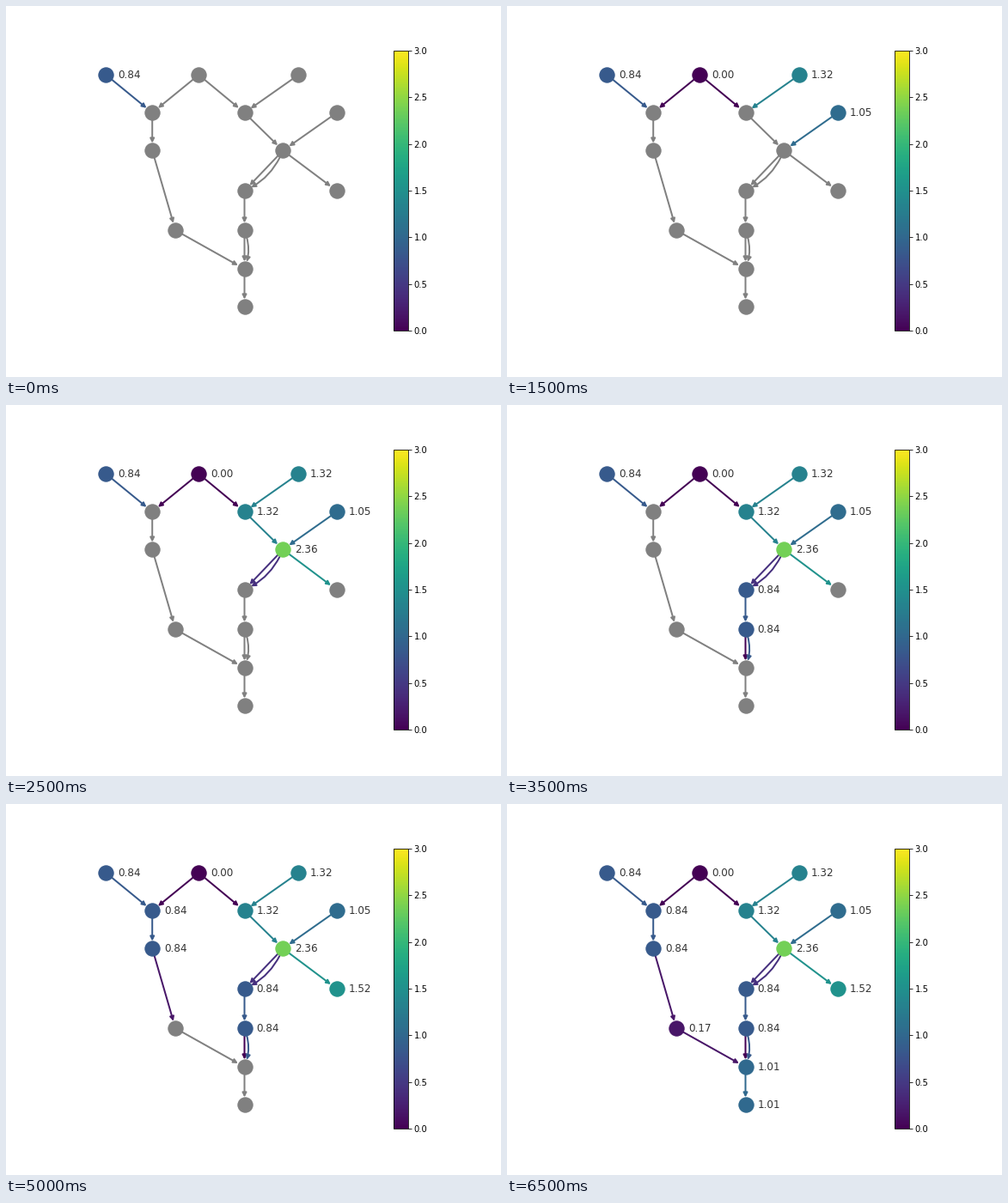
A matplotlib script that plays this animation: 576x432 px, repeating every 7 s.

```python
import matplotlib.pyplot as plt
from matplotlib.animation import FuncAnimation
from matplotlib.cm import ScalarMappable
from matplotlib.colors import Normalize
from matplotlib.patches import FancyArrowPatch

W, H, DPI = 576, 432, 72
STEP_MS = 500
IDLE = "gray"

# name: (x, y, value), in pixels from the top left
NODES = {
    "a": (116.4, 80.2, 0.84),
    "b": (224.3, 80.2, 0.00),
    "c": (340.3, 80.2, 1.32),
    "d": (170.2, 124.3, 0.84),
    "e": (277.5, 124.3, 1.32),
    "f": (384.9, 124.3, 1.05),
    "g": (170.2, 168.3, 0.84),
    "h": (322.3, 168.3, 2.36),
    "i": (277.5, 215.2, 0.84),
    "j": (384.9, 215.2, 1.52),
    "k": (197.2, 261.2, 0.17),
    "l": (277.5, 261.2, 0.84),
    "m": (277.5, 306.2, 1.01),
    "n": (277.5, 350.2, 1.01),
}

# start, end, flow, bend
EDGES = [
    ("a", "d", 0.84, 0), ("b", "d", 0.00, 0), ("b", "e", 0.00, 0),
    ("c", "e", 1.32, 0), ("f", "h", 1.05, 0), ("e", "h", 1.32, 0),
    ("d", "g", 0.84, 0), ("g", "k", 0.17, 0), ("k", "m", 0.17, 0),
    ("h", "i", 0.42, 0), ("h", "i", 0.42, -0.2), ("h", "j", 1.52, 0),
    ("i", "l", 0.84, 0), ("l", "m", 0.00, 0), ("l", "m", 0.84, -0.2),
    ("m", "n", 1.01, 0),
]

ORDER = "afcbehiljdgkmn"  # one node is evaluated per step

plt.rcParams["font.family"] = "DejaVu Sans"
fig = plt.figure(figsize=(W / DPI, H / DPI), dpi=DPI, facecolor="white")
ax = fig.add_axes([0, 0, 1, 1])
ax.set(xlim=(0, W), ylim=(H, 0))
ax.axis("off")

scale = ScalarMappable(Normalize(0, 3), "viridis")
bar = fig.add_axes([451.44 / W, 0.125, 16.3 / W, 0.755])
fig.colorbar(scale, cax=bar)
bar.tick_params(labelsize=10)


def make_arrow(start, end, bend):
    arrow = FancyArrowPatch(
        NODES[start][:2], NODES[end][:2], arrowstyle="-|>",
        connectionstyle=f"arc3,rad={bend}", mutation_scale=10,
        shrinkA=8.66, shrinkB=8.66, linewidth=2, color=IDLE, zorder=1)
    return ax.add_patch(arrow)


arrows = [make_arrow(s, e, bend) for s, e, _, bend in EDGES]
dots, labels = {}, {}
for name, (x, y, value) in NODES.items():
    dots[name] = ax.scatter([x], [y], s=300, c=IDLE, linewidths=1, zorder=2)
    labels[name] = ax.text(x + 27, y, f"{value:.2f}", size=12, alpha=0.8,
                           ha="center", va="center", zorder=3)


def draw(step):
    done = ORDER[:step + 1]
    for name, (_, _, value) in NODES.items():
        lit = name in done
        dots[name].set_color(scale.to_rgba(value) if lit else IDLE)
        labels[name].set_visible(lit)
    for arrow, (start, _, flow, _) in zip(arrows, EDGES):
        arrow.set_color(scale.to_rgba(flow) if start in done else IDLE)
    return arrows


anim = FuncAnimation(fig, draw, frames=len(ORDER), interval=STEP_MS,
                     repeat=True, repeat_delay=0, blit=False)
plt.show()
```
